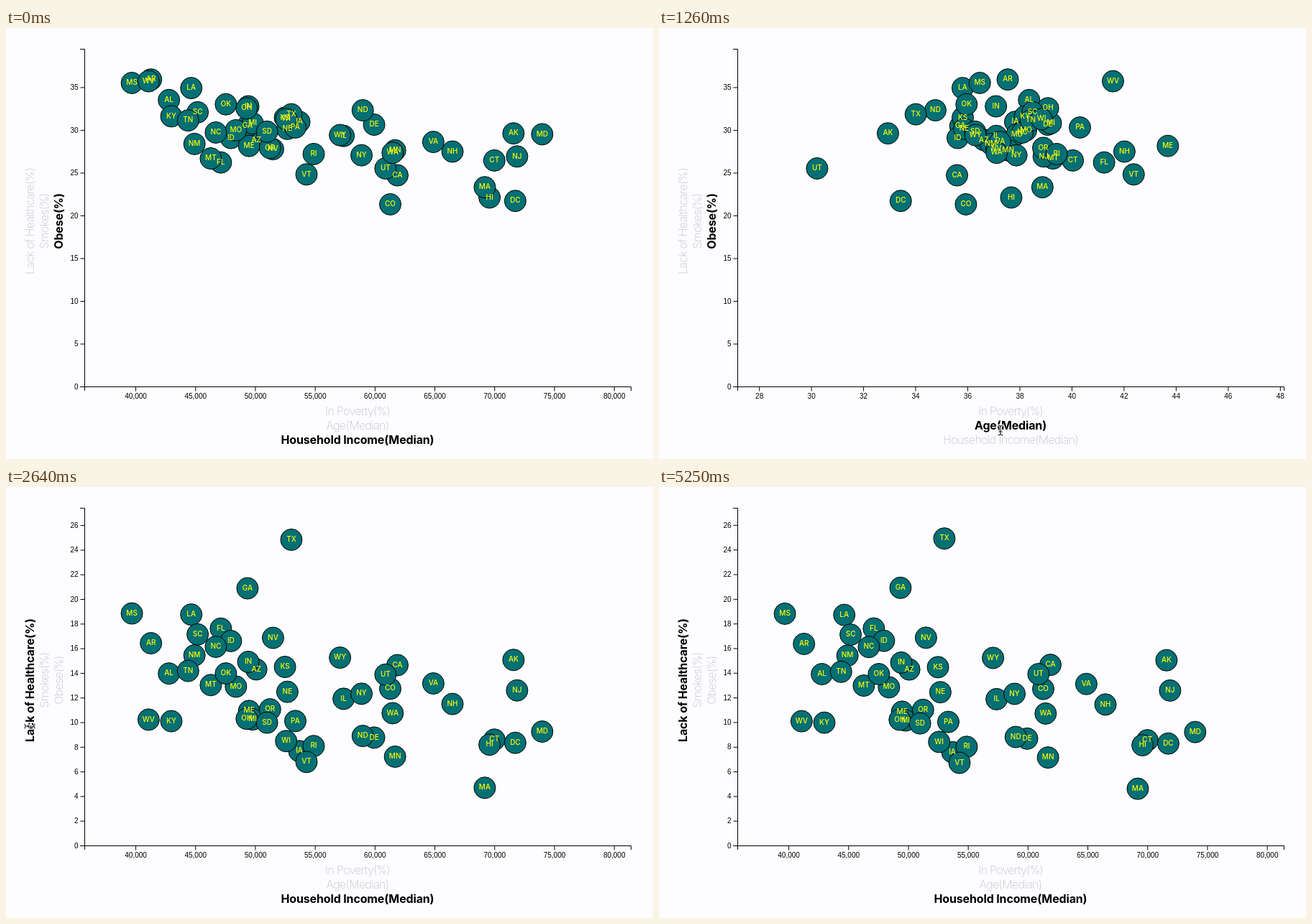
An HTML page for the animation above (5.28 s loop, 900 px wide and 600 px high).

```html
<!DOCTYPE html>
<html lang="en">
<head>
<meta charset="utf-8">
<title>State health scatter plot</title>
<style>
  html, body { margin: 0; width: 100%; height: 100%; overflow: hidden; background: #fdfdff; }
  svg { display: block; width: 900px; height: 600px; }
  .axis { stroke: #000; fill: none; }
  .tick { font: 10px "Liberation Sans", Arial, sans-serif; }
  .dot { fill: #047074; stroke: #000; }
  .abbr { font: 500 10px Inter, sans-serif; fill: #ff0; text-anchor: middle; }
  .label { font: 200 16px Inter, sans-serif; letter-spacing: -.042em; fill: #c0c0d0; text-anchor: middle; }
  .label.hover { fill: #000; }
  .label.active { font-weight: 700; letter-spacing: -.009em; fill: #000; }
  .tip { font: 12px Inter, sans-serif; fill: #fff; text-anchor: middle; }
  .cursor { stroke-linejoin: round; stroke-linecap: round; }
</style>
</head>
<body>
<svg id="stage" viewBox="0 0 900 600"></svg>
<script>
const LOOP = 5280, STEP = 30, FADE = 280;
const LEFT = 109, TOP = 29, WIDTH = 760, HEIGHT = 470, BASE = TOP + HEIGHT;

const clamp = u => Math.max(0, Math.min(1, u));
const mix = (a, b, u) => a + (b - a) * u;
const cubic = u => u < .5 ? 4 * u ** 3 : 1 - 4 * (1 - u) ** 3;
const smooth = u => u * u * (3 - 2 * u);

// States from lowest to highest; those without a value are spread evenly between their neighbours.
function rank(list, unit = 1) {
  const items = list.split(' ').map(s => s.split(':'));
  const data = {};
  let last = 0;
  items.forEach(([, value], i) => {
    if (!value) return;
    for (let j = last; j <= i; j++)
      data[items[j][0]] = unit * mix(+items[last][1], +value, (j - last) / (i - last || 1));
    last = i;
  });
  return data;
}

const income = rank('MS:39.7 WV:41.1 AR:41.3 AL:42.8 KY:43 TN:44.4 LA NM SC:45.2 MT:46.3 NC FL OK ID MO:48.4 ' +
  'OH:49.3 GA IN ME:49.5 MI AZ:50.1 SD:51 OR NV:51.5 KS:52.5 WI NE:52.7 TX PA IA:53.7 VT RI:54.9 WY:57.1 IL:57.4 ' +
  'NY:58.9 ND:59 DE UT:60.9 CO:61.3 WA MN CA:61.9 VA:64.9 NH:66.5 MA:69.2 HI CT:70 AK:71.6 DC NJ:71.9 MD:74', 1000);
const age = rank('UT:30.5 AK:33.3 DC TX:34.3 ND:35.1 ID:35.9 CA GA LA KS NE OK CO:36.3 SD:36.6 WY MS:36.7 AZ NM ' +
  'IN:37.4 NV IL WA:37.5 VA AR MN HI:38.1 IA NY MD NC KY MO AL TN SC:38.8 WI:39.2 OR MA NJ OH DE MI MT:39.6 ' +
  'RI:39.8 CT:40.5 PA:40.7 FL:41.6 WV:41.9 NH:42.5 VT:42.8 ME:44.1');
const healthcare = rank('MA:4.6 VT:6.7 MN IA RI:8 HI DC WI CT DE ND:8.8 MD:9.2 SD:9.9 KY PA WV MI OH:10.2 WA:10.7 ' +
  'ME OR:11 NH IL NY:12.3 NE NJ CO MO MT VA:13.1 AL:13.9 OK UT:13.9 TN AZ KS CA IN AK WY NM:15.4 NC:16.1 AR ID NV ' +
  'SC:17.1 FL:17.6 LA:18.7 MS:18.8 GA:20.9 TX:24.9');
const smokes = rank('UT:9.7 CA:12.8 HI:14.1 NY TX MD MA:14.7 NJ WA CT CO ID MN:16.3 RI DC VT AZ IL:16.5 NV:17 OR NE ' +
  'GA WI NH FL:17.7 KS IA SD:18.6 NC:19.1 NM ME VA WY:19.5 AK DE MT ND PA:19.9 MO:20.6 OH:21 AL OK MI SC:21.5 ' +
  'IN:22.9 MS:23 LA:24 TN AR:24.7 KY:26.2 WV:26.7');
const obese = rank('CO:21.3 DC HI:22.1 MA:23.3 CA:24.7 VT:24.8 UT FL:26.2 CT MT NJ:26.9 NY RI WA NH MN NV OR:27.9 ' +
  'ME NM VA AZ ID IL:29.3 WY MD AK NC SD:29.8 MO NE PA GA DE MI IA TN WI KS KY:31.6 TX SC ND OH IN OK:33 AL:33.5 ' +
  'LA:34.9 MS:35.5 WV AR:35.9');

// Poverty falls as income rises.
const states = Object.keys(income).sort();
const poverty = {};
for (const s of states)
  poverty[s] = mix(9.2, 21.5, ((income.MD - income[s]) / (income.MD - income.MS)) ** 1.5);

// A measure knows its data, its scale and its ticks.
function measure(data, step, vertical) {
  const values = Object.values(data);
  const lo = vertical ? 0 : Math.min(...values) * .9;
  const hi = Math.max(...values) * 1.1;
  const place = vertical
    ? v => BASE - v / hi * HEIGHT
    : v => LEFT + (v - lo) / (hi - lo) * WIDTH;
  const ticks = [];
  for (let v = Math.ceil(lo / step) * step; v <= hi; v += step) ticks.push(v);
  return { data, place, ticks };
}
const M = {
  poverty: measure(poverty, 2), age: measure(age, 2), income: measure(income, 5000),
  healthcare: measure(healthcare, 2, true), smokes: measure(smokes, 2, true), obese: measure(obese, 5, true)
};

// Clicks: time and chosen measure.
const xSteps = [[-1000, 'income'], [720, 'poverty'], [1019, 'age'], [1400, 'income']];
const ySteps = [[-1000, 'obese'], [1961, 'smokes'], [2396, 'healthcare']];

// Pointer stops: arrival, departure, x, y.
const stops = [[60, 60, 902, 606], [570, 800, 472, 540], [960, 1260, 475, 560], [1380, 1600, 484, 573],
  [1900, 2190, 54, 303], [2340, 2700, 33, 333], [3150, 3200, 668, 422], [3300, 4380, 593, 396], [4650, 4650, 902, 606]];

const stage = document.getElementById('stage');
function set(e, attrs) { for (const k in attrs) e.setAttribute(k, attrs[k]); }
function el(tag, attrs, parent = stage, text) {
  const e = document.createElementNS('http://www.w3.org/2000/svg', tag);
  set(e, attrs);
  if (text !== undefined) e.textContent = text;
  return parent.appendChild(e);
}

el('rect', { x: 8, y: 4, width: 900, height: 588 }, el('clipPath', { id: 'plot' }, el('defs', {})));
const axes = el('g', { 'clip-path': 'url(#plot)' });

function tickPool(vertical) {
  return Array.from({ length: 24 }, () => {
    const g = el('g', { class: 'tick' }, axes);
    el('path', { class: 'axis', d: vertical ? 'M0 0H-6' : 'M0 0V6' }, g);
    const text = el('text', vertical
      ? { x: -9, dy: '.32em', 'text-anchor': 'end' }
      : { y: 9, dy: '.71em', 'text-anchor': 'middle' }, g);
    return { g, text };
  });
}
const xTicks = tickPool(false), yTicks = tickPool(true);
el('path', { class: 'axis', d: `M${LEFT + .5} ${BASE + 6}v-5.5h${WIDTH}v5.5` }, axes);
el('path', { class: 'axis', d: `M${LEFT - 6} ${TOP + .5}h6.5v${HEIGHT}h-6.5` }, axes);

const dots = states.map(() => el('circle', { class: 'dot', r: 15 }));
const names = states.map(s => el('text', { class: 'abbr' }, stage, s));

function label(key, text, vertical, at) {
  const transform = vertical ? `translate(${at} 269) rotate(-90)` : `translate(489 ${at})`;
  return { key, vertical, at, e: el('text', { class: 'label', transform }, stage, text) };
}
const labels = [
  label('poverty', 'In Poverty(%)', false, 539),
  label('age', 'Age(Median)', false, 559),
  label('income', 'Household Income(Median)', false, 579),
  label('healthcare', 'Lack of Healthcare(%)', true, 39),
  label('smokes', 'Smokes(%)', true, 59),
  label('obese', 'Obese(%)', true, 79)
];

const tip = el('g', { transform: 'translate(658 470)' });
el('rect', { width: 88, height: 75, fill: '#223' }, tip);
['Massachusetts', 'Income: 69200', 'Healthcare:', '4.6%'].forEach((s, i) =>
  el('text', { class: 'tip', x: 44, y: 16 + i * 17 }, tip, s));

const cursors = {
  arrow: el('path', { class: 'cursor', fill: '#000', stroke: '#fff',
    d: 'M0 0V15.5L3.6 12.2L6.2 18L9 16.8L6.5 11.2H11.3Z' }),
  hand: el('path', { class: 'cursor', fill: '#fff', stroke: '#000',
    d: 'M-2 1Q-2 -.6 -.7 -.6Q.6 -.6 1 1L2 6V4.6Q4 3.4 4.8 5.2Q6.4 4.2 7.1 6Q9 5.2 9.3 7.2V10.5L7.5 15.5H-.5Q-2.2 12.6 -5.5 9.4Q-6 7.5 -4 7.8L-1 9.6Z' }),
  text: el('g', { class: 'cursor', fill: 'none' })
};
for (const [stroke, width] of [['#fff', 3], ['#000', 1]])
  el('path', { stroke, 'stroke-width': width, d: 'M-3 -7Q0 -7 0 -5Q0 -7 3 -7M0 -5V5M-3 7Q0 7 0 5Q0 7 3 7M-2 2H2' }, cursors.text);

function phase(steps, t) {
  let i = steps.length - 1;
  while (steps[i][0] > t) i--;
  const [at, key] = steps[i];
  return { key, now: M[key], old: M[steps[Math.max(0, i - 1)][1]], p: cubic(clamp((t - at) / FADE)) };
}

// Old ticks slide out and fade while new ones slide in from the old scale.
function drawTicks(pool, { now, old, p }, vertical) {
  const values = [...new Set([...now.ticks, ...(p < 1 ? old.ticks : [])])];
  pool.forEach(({ g, text }, i) => {
    const v = values[i];
    if (v === undefined) return set(g, { visibility: 'hidden' });
    const at = mix(old.place(v), now.place(v), p) + .5;
    const fresh = !old.ticks.includes(v), stale = !now.ticks.includes(v);
    text.textContent = v.toLocaleString('en-US');
    set(g, {
      visibility: 'visible',
      opacity: fresh ? p : stale ? 1 - p : 1,
      transform: vertical ? `translate(${LEFT + .5} ${at})` : `translate(${at} ${BASE + .5})`
    });
  });
}

function pointer(t) {
  let i = 0;
  while (i < stops.length - 2 && t >= stops[i + 1][0]) i++;
  const [, leave, x, y] = stops[i], [arrive, , nextX, nextY] = stops[i + 1];
  const u = smooth(clamp((t - leave) / (arrive - leave)));
  return [mix(x, nextX, u), mix(y, nextY, u)];
}

function drawPointer(t, active) {
  const [x, y] = pointer(t);
  let kind = 'arrow', turn = 0;
  for (const l of labels) {
    const [along, across] = l.vertical ? [y - 269, x] : [x - 489, y];
    const over = Math.abs(along) < l.e.getComputedTextLength() / 2 && across > l.at - 15 && across <= l.at + 4;
    const on = active.includes(l.key);
    l.e.setAttribute('class', 'label' + (on ? ' active' : over ? ' hover' : ''));
    if (over) {
      kind = on ? 'text' : 'hand';
      turn = on && l.vertical ? 90 : 0;
    }
  }
  for (const k in cursors)
    set(cursors[k], { visibility: k === kind ? 'visible' : 'hidden', transform: `translate(${x} ${y}) rotate(${turn})` });
}

function draw(t) {
  const px = phase(xSteps, t), py = phase(ySteps, t);
  drawTicks(xTicks, px, false);
  drawTicks(yTicks, py, true);
  const spot = ({ now, old, p }, s) => mix(old.place(old.data[s]), now.place(now.data[s]), p);
  states.forEach((s, i) => {
    const x = spot(px, s), y = spot(py, s);
    set(dots[i], { cx: x, cy: y });
    set(names[i], { x, y: y + 2.7 });
  });
  set(tip, { opacity: t < 3150 ? 0 : clamp((3307 - t) / 100) });
  drawPointer(t, [px.key, py.key]);
}

const start = performance.now();
function frame() {
  const t = (performance.now() - start) % LOOP;
  draw(Math.floor(t / STEP) * STEP);
  requestAnimationFrame(frame);
}
frame();
</script>
</body>
</html>
```
